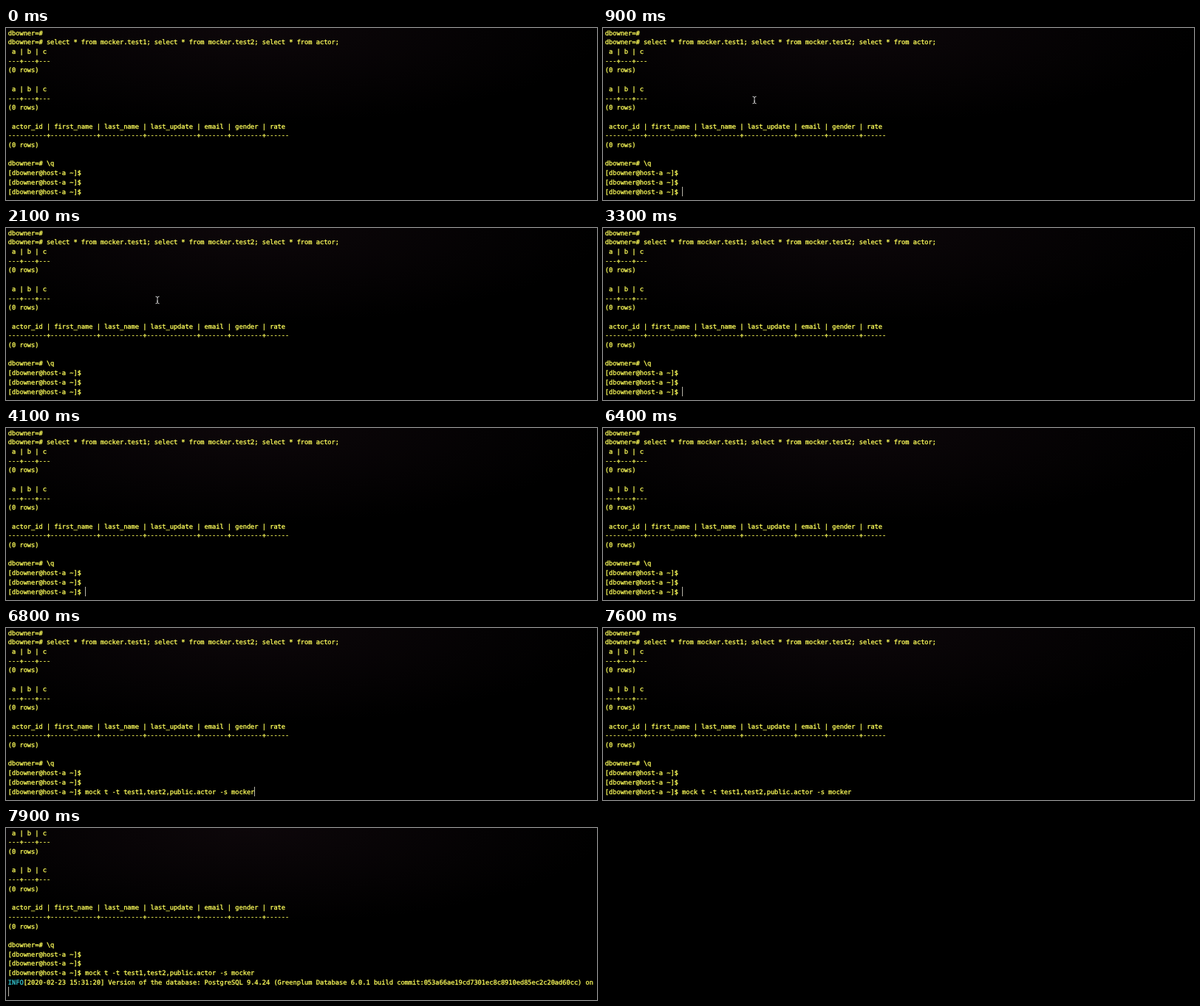
Write an HTML page that moves like this. It is 800x234 px and loops after 8 s.

```html
<!DOCTYPE html>
<html lang="en">
<head>
<meta charset="utf-8">
<title>Terminal session</title>
<style>
  html, body { margin: 0; width: 100%; height: 100%; overflow: hidden; background: #000; }
  #stage {
    position: absolute; left: 0; top: 0; width: 800px; height: 234px; overflow: hidden;
    background: radial-gradient(ellipse 480px 130px at 330px 0, #0d070a, #000);
  }
  #screen {
    position: absolute; left: 2.8px; top: 1.6px; margin: 0;
    font: 8.66px/12.7px "DejaVu Sans Mono", monospace;
    font-variant-ligatures: none; text-rendering: geometricPrecision;
    -webkit-text-stroke: .3px; color: #ffff5a; white-space: pre;
  }
  #info { color: #35c5cf; }
  #caret { position: absolute; width: 1px; height: 13px; background: #b4b2a6; }
  #pointer { position: absolute; left: 0; top: 0; width: 8px; height: 12px; }
</style>
</head>
<body>
<div id="stage">
  <pre id="screen"><span id="log"></span><span id="info"></span><span id="rest"></span></pre>
  <div id="caret"></div>
  <svg id="pointer" viewBox="0 0 8 12" fill="none" stroke="#d0d0d0">
    <path d="M1.5 1.2Q4 1.2 4 3V9Q4 10.8 1.5 10.8M6.5 1.2Q4 1.2 4 3M4 9Q4 10.8 6.5 10.8M3 7.5H5"/>
  </svg>
</div>
<script>
const LOOP = 8000, ROW = 12.7, COLUMN = 5.213;
const RECALL = 6600, OUTPUT = 7900;
const $ = id => document.getElementById(id);

const sqlPrompt = 'dbowner=#';
const shellPrompt = '[dbowner@host-a ~]$ ';
const command = 'mock t -t test1,test2,public.actor -s mocker';

const emptyTable = names => [
  names.map(name => ` ${name} `).join('|'),
  names.map(name => '-'.repeat(name.length + 2)).join('+'),
  '(0 rows)', ''
];

const history = [
  sqlPrompt,
  sqlPrompt + ' select * from mocker.test1; select * from mocker.test2; select * from actor;',
  ...emptyTable(['a', 'b', 'c']),
  ...emptyTable(['a', 'b', 'c']),
  ...emptyTable(['actor_id', 'first_name', 'last_name', 'last_update', 'email', 'gender', 'rate']),
  sqlPrompt + ' \\q',
  shellPrompt, shellPrompt, shellPrompt
];
const version = '[2020-02-23 15:31:20] Version of the database: PostgreSQL 9.4.24 ' +
  '(Greenplum Database 6.0.1 build commit:053a66ae19cd7301ec8c8910ed85ec2c20ad60cc) on';

// The caret starts hidden and toggles at each of these times.
const blinks = [600, 1100, 1600, 2100, 2600, 3100, 3300, 7600, OUTPUT];

function drawText(recalled, running) {
  const lines = history.join('\n') + (recalled ? command : '');
  $('log').textContent = running ? lines.split('\n').slice(2).join('\n') + '\n' : lines;
  $('info').textContent = running ? 'INFO' : '';
  $('rest').textContent = running ? version : '';
}

function drawCaret(t, recalled, running) {
  const column = running ? 0 : shellPrompt.length + (recalled ? command.length : 0);
  const visible = blinks.filter(time => time <= t).length % 2;
  $('caret').style.display = visible ? 'block' : 'none';
  $('caret').style.left = Math.round(2.8 + column * COLUMN) + 'px';
  $('caret').style.top = Math.round(17 * ROW) + 'px';
}

function drawPointer(t) {
  const progress = Math.min(1, Math.max(0, (t - 100) / 800));
  const eased = 1 - (1 - progress) ** 3;
  const x = Math.round(-8 + 209 * eased), y = Math.round(120 - 28 * eased);
  $('pointer').style.display = t >= 100 && t < 2600 ? 'block' : 'none';
  $('pointer').style.transform = `translate(${x}px, ${y}px)`;
}

let state;
function frame() {
  const t = performance.now() % LOOP;
  const recalled = t >= RECALL, running = t >= OUTPUT;
  if (state !== recalled + running) {
    state = recalled + running;
    drawText(recalled, running);
  }
  drawCaret(t, recalled, running);
  drawPointer(t);
  requestAnimationFrame(frame);
}
frame();
</script>
</body>
</html>
```
